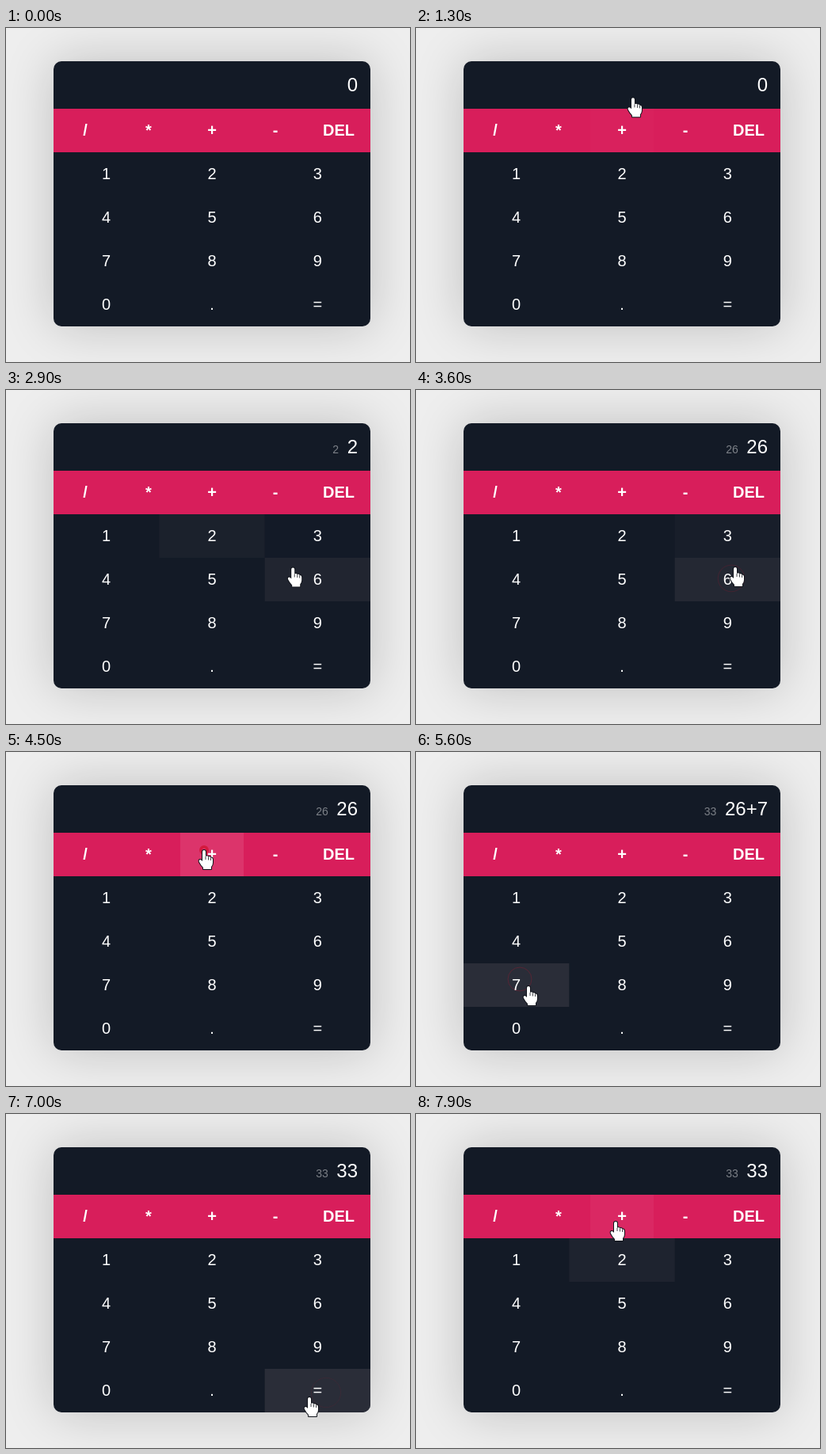
An HTML page with a canvas for the animation above (8 s loop, 510 by 422 pixels).

```html
<!DOCTYPE html>
<html lang="en">
<head>
<meta charset="utf-8">
<title>Calculator</title>
<style>
html, body { margin: 0; width: 510px; height: 422px; overflow: hidden; background: #eee; }
canvas { display: block; }
</style>
</head>
<body>
<canvas id="stage" width="510" height="422"></canvas>
<script>
const ctx = document.getElementById('stage').getContext('2d');
const FONT = '"Liberation Sans", Arial, sans-serif';
const LOOP = 8000, STEP = 100, FADE = 250, HOVER_LEAD = 70;
const BOX = { x: 60, y: 42, w: 400, h: 335 };
const NAVY = '#131a26', PINK = '#d81e5b';

const cells = [
  ...['/', '*', '+', '-', 'DEL'].map((label, i) =>
    ({ label, x: 60 + i * 80, y: 102, w: 80, op: true })),
  ...[...'1234567890.='].map((label, i) =>
    ({ label, x: 60 + (i % 3) * 400 / 3, y: 157 + Math.floor(i / 3) * 55, w: 400 / 3, op: false }))
];

// Pointer stops: time, x, y; a trailing 1 marks a constant-speed arrival
const stops = [
  [1000, 283, 25], [1700, 260, 186], [2600, 260, 186],
  [3050, 398, 238], [3480, 398, 238], [3600, 403, 224], [3620, 404, 206, 1],
  [4250, 250, 124], [4650, 250, 124], [5150, 131, 287], [5450, 131, 287],
  [5600, 142, 296], [6250, 400, 372], [6380, 402, 372], [6520, 404, 352],
  [6700, 404, 352], [6950, 383, 358], [7400, 383, 358], [7900, 252, 136, 1],
  [8000, 250, 125]
];
const clicks = [2050, 3200, 4440, 5250, 6550];

// Time, expression, small result
const readouts = [
  [0, '0', ''], [2150, '2', '2'], [3300, '26', '26'],
  [4600, '26+', '26'], [5400, '26+7', '33'], [6650, '33', '33']
];

function pointerAt(t) {
  if (t < stops[0][0]) return null;
  const i = stops.findIndex(s => s[0] > t);
  if (i < 0) return stops.at(-1).slice(1, 3);
  const [t0, x0, y0] = stops[i - 1], [t1, x1, y1, linear] = stops[i];
  const u = (t - t0) / (t1 - t0);
  const k = linear ? u : u * u * (3 - 2 * u);
  return [x0 + (x1 - x0) * k, y0 + (y1 - y0) * k];
}

function inside(c, p) {
  return p && p[0] >= c.x && p[0] < c.x + c.w && p[1] >= c.y && p[1] < c.y + 55;
}

// Share of the recent past spent over a cell, which gives a linear fade
function hoverAmount(c, t) {
  const n = 25;
  let hits = 0;
  for (let i = 0; i < n; i++) {
    if (inside(c, pointerAt(t + HOVER_LEAD - i * FADE / n))) hits++;
  }
  return hits / n;
}

function text(str, x, y, font, color, align) {
  ctx.font = `${font} ${FONT}`;
  ctx.fillStyle = color;
  ctx.textAlign = align;
  ctx.fillText(str, x, y);
  return ctx.measureText(str).width;
}

function drawBody() {
  ctx.fillStyle = '#eee';
  ctx.fillRect(0, 0, 510, 422);
  ctx.beginPath();
  ctx.roundRect(BOX.x, BOX.y, BOX.w, BOX.h, 10);
  ctx.save();
  ctx.shadowColor = 'rgba(0,0,0,.2)';
  ctx.shadowBlur = 64;
  ctx.fillStyle = NAVY;
  ctx.fill();
  ctx.restore();
}

function drawCells(t) {
  ctx.save();
  ctx.clip();
  ctx.fillStyle = PINK;
  ctx.fillRect(BOX.x, 102, BOX.w, 55);
  for (const c of cells) {
    ctx.globalAlpha = hoverAmount(c, t);
    ctx.fillStyle = c.op ? '#dc346b' : '#2a2d38';
    ctx.fillRect(c.x, c.y, c.w, 55);
  }
  ctx.restore();
  for (const c of cells) {
    text(c.label, c.x + c.w / 2, c.y + 34, c.op ? 'bold 20px' : '20px', '#fff', 'center');
  }
}

function drawReadout(t) {
  const [, value, result] = readouts.findLast(r => r[0] <= t);
  const width = text(value, 444, 80, '24px', '#fff', 'right');
  text(result, 444 - width - 10.6, 80, '14px', '#7c8087', 'right');
}

function drawRing(t) {
  for (const start of clicks) {
    const age = t - start;
    if (age < 0 || age >= 500) continue;
    const [x, y] = pointerAt(start);
    ctx.globalAlpha = 0.85 * (1 - age / 500);
    ctx.strokeStyle = '#d2102c';
    ctx.lineWidth = Math.max(1, 4 - age / 100);
    ctx.beginPath();
    ctx.arc(x, y, 2 + age * 0.037, 0, Math.PI * 2);
    ctx.stroke();
    ctx.globalAlpha = 1;
  }
}

const hand = new Path2D(
  'M-2 2Q-2 0 0 0Q2 0 2 2V8Q4 6.500 5.500 8.500Q7.500 7.500 8.500 9.500' +
  'Q11 9 11 12V16Q11 18.500 9 21V24H-1V22Q-4 19 -6 15' +
  'Q-7 12.500 -5 12Q-3.500 12 -2 14Z');
const knuckles = new Path2D('M2 8V12M5.500 8.500V12.500M8.500 9.500V13');

function drawPointer(t) {
  const p = pointerAt(t);
  if (!p) return;
  ctx.save();
  ctx.translate(p[0], p[1]);
  ctx.lineJoin = 'round';
  ctx.strokeStyle = '#10131a';
  ctx.lineWidth = 2;
  ctx.stroke(hand);
  ctx.fillStyle = '#fff';
  ctx.fill(hand);
  ctx.lineWidth = 0.8;
  ctx.stroke(knuckles);
  ctx.restore();
}

const origin = performance.now();
function frame() {
  const elapsed = (performance.now() - origin) % LOOP;
  const t = Math.floor(elapsed / STEP) * STEP;
  drawBody();
  drawCells(t);
  drawReadout(t);
  drawRing(t);
  drawPointer(t);
  requestAnimationFrame(frame);
}
frame();
</script>
</body>
</html>
```
